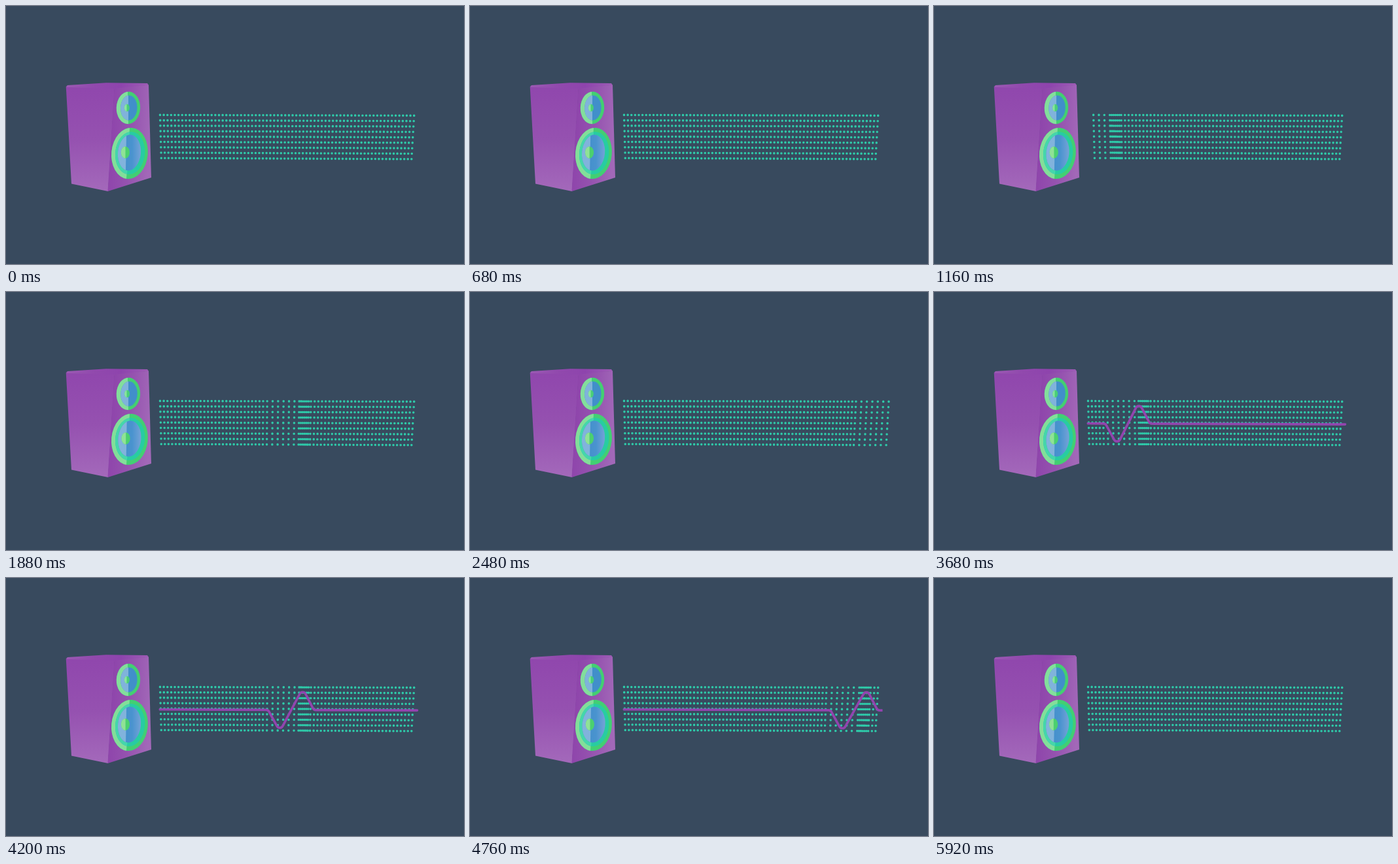
These frames come from a looping animation (700x394 px, 5.96 s). An HTML page with a canvas:

```html
<!DOCTYPE html>
<html lang="en">
<head>
<meta charset="utf-8">
<title>Speaker and sound wave</title>
<style>
  html, body { margin: 0; width: 100%; height: 100%; overflow: hidden; background: #384a5e; }
  canvas { display: block; width: 700px; height: 394px; }
</style>
</head>
<body>
<canvas id="stage" width="700" height="394"></canvas>
<script>
const ctx = document.getElementById('stage').getContext('2d');
const LOOP = 5960;
const COLS = 70, ROWS = 9;
const HALF = 6, PUSH = 16.3;

// [time, column at the crest] for each pulse
const PULSES = [
  [[640, -8], [1160, 3], [1880, 34.8], [2480, 69], [2640, 76]],
  [[3200, -7], [3680, 10.6], [4760, 61], [5160, 76]]
];

const mix = (a, b, k) => a + (b - a) * k;
const clamp = k => Math.max(0, Math.min(1, k));

// Smooth curve through the keys
function follow(keys, t) {
  const last = keys.length - 1;
  if (t <= keys[0][0]) return keys[0][1];
  if (t >= keys[last][0]) return keys[last][1];
  let i = 0;
  while (t > keys[i + 1][0]) i++;
  const slope = n => {
    const a = keys[Math.max(0, n - 1)], b = keys[Math.min(last, n + 1)];
    return (b[1] - a[1]) / (b[0] - a[0]);
  };
  const [t0, p0] = keys[i], [t1, p1] = keys[i + 1];
  const d = t1 - t0, s = (t - t0) / d, s2 = s * s, s3 = s2 * s;
  return (2 * s3 - 3 * s2 + 1) * p0 + (s3 - 2 * s2 + s) * d * slope(i)
    + (3 * s2 - 2 * s3) * p1 + (s3 - s2) * d * slope(i + 1);
}

function poly(points, fill) {
  ctx.beginPath();
  points.forEach(([x, y]) => ctx.lineTo(x, y));
  ctx.closePath();
  ctx.fillStyle = fill;
  ctx.fill();
}

function ramp(x0, y0, x1, y1, ...colors) {
  const g = ctx.createLinearGradient(x0, y0, x1, y1);
  colors.forEach((c, i) => g.addColorStop(i / (colors.length - 1), c));
  return g;
}

// Ellipse with a lighter part left of a slanted line
function disc(x, y, rx, ry, tilt, base, light, top, bottom) {
  ctx.save();
  ctx.beginPath();
  ctx.ellipse(x, y, rx, ry, tilt, 0, Math.PI * 2);
  ctx.fillStyle = base;
  ctx.fill();
  if (light) {
    ctx.clip();
    poly([[x - 60, y - ry], [top, y - ry], [bottom, y + ry], [x - 60, y + ry]], light);
  }
  ctx.restore();
}

function cabinet() {
  poly([[92, 123], [94, 121], [153, 117.3], [216, 118], [218, 121], [166, 127], [93, 125]],
    ramp(92, 0, 218, 0, '#9b5ab3', '#9149ad', '#8e44ad', '#9c5cb4'));
  poly([[91.7, 123], [94, 124], [166, 126], [156, 283], [100, 271.5]],
    ramp(0, 124, 0, 280, '#9047ad', '#9551b0', '#a368ba'));
  poly([[165.5, 126], [218, 120.5], [222, 262], [155.5, 283]],
    ramp(158, 200, 220, 204, '#8e44ab', '#9552af', '#a268b8'));
}

function cones(d) {
  disc(187, 155.5, 18.2, 24.7, 0.04, '#43cf72', '#83de9c', 186, 187);
  disc(187.8 + d * 0.3, 155.5, 12.7, 19, 0.04, '#418fca', '#80b3db', 187, 187);
  disc(184.8 + d * 0.5, 155.5, 4, 5.8, 0, '#49ce79', '#8ae3a0', 184.5, 184.5);

  disc(189, 225, 27.8, 39.2, 0.1, '#42cf73', '#83de9a', 189, 184);
  disc(189.7, 224.6, 22.6, 32.6, 0.1, '#28cca2', '#45d6ab', 189, 185);
  disc(188.5 + d * 0.6, 224, 17.5, 27.5, 0.1,
    ramp(180, 0, 206, 0, '#438fcb', '#4a94cf', '#73a2d7'), '#81b3dc', 184 + d, 183 + d);
  disc(182.4 + d, 223.6, 6.6, 9.2, 0, '#4bd06f', '#90e296', 182.5 + d, 182.5 + d);
}

function dots(crest) {
  ctx.fillStyle = '#2ecaa9';
  ctx.beginPath();
  for (let c = 0; c < COLS; c++) {
    const u = c / (COLS - 1);
    const push = PUSH * Math.max(0, 1 - Math.abs(c - crest) / HALF);
    for (let r = 0; r < ROWS; r++) {
      const v = r / (ROWS - 1);
      const x = mix(mix(235.5, 237.3, v), mix(623.7, 619.8, v), u) + push;
      const y = mix(mix(166.4, 167.4, u), mix(232.2, 233.8, u), v);
      ctx.moveTo(x + 1.8, y);
      ctx.arc(x, y, 1.8, 0, Math.PI * 2);
    }
  }
  ctx.fill();
}

function curve(crest, alpha) {
  if (alpha <= 0) return;
  const k = (crest - 10.6) / 50.4;
  const x = 262 + 289 * k, gap = 33 + 4 * k;
  const base = px => 200.8 + (px - 235) / 394 * 1.3;
  const bends = [[x, 0, 5], [x + 18, 33, 5], [x + 18 + gap, -33, 5], [x + 35 + gap, 0, 5]];
  ctx.save();
  ctx.beginPath();
  ctx.rect(233.5, 150, 397, 100);
  ctx.clip();
  ctx.globalAlpha = alpha;
  ctx.strokeStyle = '#9244ae';
  ctx.lineWidth = 3.6;
  ctx.lineCap = ctx.lineJoin = 'round';
  ctx.beginPath();
  ctx.moveTo(Math.min(235, x - 20), base(235));
  bends.forEach(([px, dy, r], i) => {
    const next = bends[i + 1] || [Math.max(628.5, px + 20), 0];
    ctx.arcTo(px, base(px) + dy, next[0], base(next[0]) + next[1], r);
  });
  ctx.lineTo(Math.max(628.5, x + 55 + gap), base(628.5));
  ctx.stroke();
  ctx.restore();
}

// Cones tremble in two bursts with a short rest between
function tremble(t) {
  const swing = (from, to, n) => (1 - Math.cos((t - from) / (to - from) * n * 2 * Math.PI)) / 2;
  if (t < 2640) return swing(0, 2640, 15);
  return t < 2920 ? 0 : swing(2920, LOOP, 14);
}

function draw(t) {
  ctx.fillStyle = '#384a5e';
  ctx.fillRect(0, 0, 700, 394);
  cabinet();
  cones(tremble(t));
  const crest = follow(PULSES[t < 2900 ? 0 : 1], t);
  dots(crest);
  curve(crest, Math.min(clamp((t - 2900) / 300), clamp((5800 - t) / 480)));
}

const start = performance.now();
function tick(now) {
  const t = Math.max(0, now - start) % LOOP;
  draw(Math.floor(t / 40) * 40);
  requestAnimationFrame(tick);
}
draw(0);
requestAnimationFrame(tick);
</script>
</body>
</html>
```
